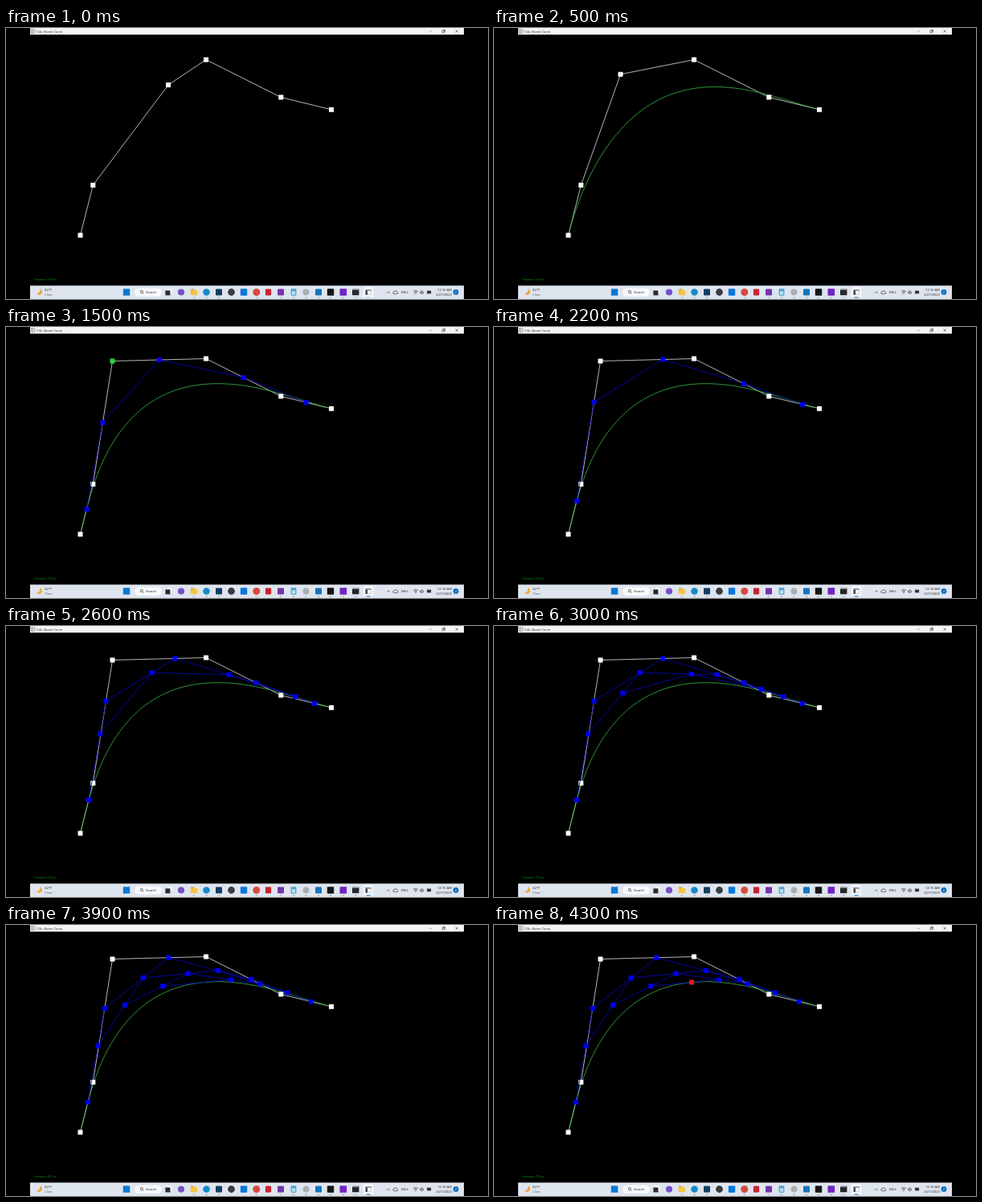
Recreate the animation shown at these times as an HTML page. Size 600 by 338 pixels, loop 4600 ms.

```html
<!DOCTYPE html>
<html lang="en">
<head>
<meta charset="utf-8">
<title>Bezier Curve</title>
<style>
html, body { margin: 0; width: 100%; height: 100%; overflow: hidden; background: #000; }
svg { display: block; width: 100%; height: 100%; font-family: "Open Sans", "Noto Sans", sans-serif; }
text { white-space: pre; }
</style>
</head>
<body>
<svg id="stage" viewBox="0 0 600 338">
  <rect width="600" height="338" fill="#000"/>

  <!-- title bar -->
  <rect x="30" width="540" height="8.3" fill="#f2f4f6"/>
  <rect x="31" y="1.7" width="5" height="4.8" fill="#fff" stroke="#777" stroke-width=".5"/>
  <path d="M32.6 1.7V6.5M34 3.2H35.4M34 4.8H35.4" stroke="#333" stroke-width=".6"/>
  <text id="title" x="38" y="5.5" font-size="3.9" fill="#222">CGL: Bezier Curve</text>
  <g fill="none" stroke="#333" stroke-width=".6">
    <path d="M526.7 4.2H530" stroke="#888"/>
    <path d="M543 3.2H545.6V5.8H543ZM544 3.2V2.3H546.5V4.8H545.6"/>
    <path d="M559.6 2.5L562.6 5.5M562.6 2.5L559.6 5.5"/>
  </g>

  <!-- drawing area -->
  <g fill="none" stroke-width=".8">
    <path id="hull" stroke="#e4e4e4"/>
    <path id="curve" stroke="#39bd45"/>
  </g>
  <g id="handles"></g>
  <path id="steps" fill="none" stroke="#0808c4" stroke-width=".8"/>
  <g id="dots"></g>
  <text id="fps" x="35" y="314.6" font-size="3.3" fill="#0a8a0a" font-family="Roboto, sans-serif"></text>

  <!-- taskbar -->
  <rect x="30" y="321.3" width="540" height="16.7" fill="#dfe5ee"/>
  <path d="M42.5 325.2A4 4 0 1 1 38 331.6A5.2 5.2 0 0 0 42.5 325.2Z" fill="#f0a52c"/>
  <g font-size="4.2" fill="#222">
    <text x="48" y="328.2">42°F</text>
    <text x="48" y="334" fill="#666">Clear</text>
    <rect x="160" y="324.4" width="34" height="10.4" rx="5.2" fill="#f7f9fc"/>
    <text x="174" y="331.2">Search</text>
    <text x="492" y="331.2">ENG</text>
    <text x="555" y="328.2" text-anchor="end">12:16 AM</text>
    <text x="555" y="334.2" text-anchor="end">2/27/2023</text>
  </g>
  <g fill="none" stroke="#333" stroke-width=".7">
    <circle cx="168.8" cy="329" r="1.6"/>
    <path d="M170 330.3L171.4 331.7"/>
    <path d="M474.2 330.6L476 328.8L477.8 330.6"/>
    <path d="M483.2 331.6A1.4 1.4 0 0 1 483.2 328.8A2 2 0 0 1 486.8 328.9A1.4 1.4 0 0 1 487 331.6Z"/>
    <path d="M507 328.6Q510 326 513 328.6M508.3 330Q510 328.6 511.7 330"/>
    <path d="M515.6 328.8H516.6L518 327.5V332L516.6 330.7H515.6ZM519.2 328.4Q520.4 329.7 519.2 331.1"/>
    <rect x="524.4" y="328" width="4.4" height="3" fill="#333"/>
  </g>
  <circle cx="510" cy="331.3" r=".7" fill="#333"/>
  <circle cx="560" cy="329.4" r="3.4" fill="#0a6fc0"/>
  <text x="560" y="330.8" font-size="3.6" fill="#fff" text-anchor="middle">2</text>
  <g id="icons"></g>
  <rect id="active" x="448.3" y="335.6" width="5.6" height="1" rx=".5"/>
</svg>

<script>
const LOOP = 4600, STEP = 100;
const $ = id => document.getElementById(id);
const NS = "http://www.w3.org/2000/svg";

function add(parent, tag, attrs) {
  const el = document.createElementNS(NS, tag);
  for (const k in attrs) el.setAttribute(k, attrs[k]);
  parent.appendChild(el);
  return el;
}

const box = (x, y, w, h, fill, rx = 0) =>
  add($("icons"), "rect", { x: x - w / 2, y: y - h / 2, width: w, height: h, rx, fill });
const disc = (x, y, r, fill) => add($("icons"), "circle", { cx: x, cy: y, r, fill });

function drawIcons() {
  const y = 329.5;
  box(150, y, 8.4, 8.4, "#0a78d4");
  box(203.4, 328.2, 5.6, 5.6, "#f7f8fa");
  box(201.4, 330.4, 6, 6, "#2b2b2b");
  disc(218, y, 4.1, "#7550c8");
  box(232, 326.6, 4, 2.4, "#d99a1c", .5);
  box(234, 330, 8.4, 6.4, "#f6c443", .6);
  disc(249.5, y, 4.3, "#168bc9");
  box(265, y, 8, 8, "#123f63", 1);
  disc(280.5, y, 4.4, "#3a3d40");
  box(296, y, 8.4, 8.4, "#0878dc", .8);
  disc(311.8, y, 4.5, "#d64a3c");
  box(326.5, y, 7.2, 8, "#c62332", 1);
  box(342, y, 8, 8, "#7434ac", 1);
  box(358, y, 6.8, 8.6, "#4aa6d4", .8);
  box(358, 330.5, 4.4, 4.4, "#b9e0ef");
  disc(373.5, y, 4, "#a9b0b3");
  box(389, y, 8, 8, "#1474bd", 1);
  box(404, y, 8.4, 8.4, "#151515", .6);
  box(419.8, y, 8.6, 8.6, "#7323c4", .6);
  box(435.2, y, 8.4, 7.6, "#242629", .6);
  box(435.2, 326.3, 8.4, 1.2, "#9a9da0");
  box(451, y, 12.5, 13, "#f3f6fa", 1.4);
  box(451, y, 7.6, 7, "#8c9096");
  box(452.4, 330.2, 4.2, 4.8, "#fff");
  box(448.8, 330.2, 1.8, 4.8, "#343a44");
  for (const x of [234, 249.5, 265, 311.8, 342, 358, 373.5, 389, 404, 419.8, 435.2])
    box(x, 336.1, 2.8, .9, "#858b94", .4);
}

// Eased value between [time, value] keys.
function track(keys, t) {
  if (t <= keys[0][0]) return keys[0][1];
  for (let i = 1; i < keys.length; i++) {
    const [t0, a] = keys[i - 1], [t1, b] = keys[i];
    if (t < t1) {
      const u = (t - t0) / (t1 - t0);
      return a + (b - a) * u * u * (3 - 2 * u);
    }
  }
  return keys[keys.length - 1][1];
}

const dragX = [[200, 202], [800, 113], [1000, 113], [1400, 132.5]];
const dragY = [[200, 71], [800, 44.5], [1000, 44.5], [1400, 42.5]];
const ratio = [[1600, .5], [1900, .88], [2200, .667], [3000, .667], [3500, .6]];
const rate = [[0, 307], [800, 377], [1500, 782], [2200, 688], [3000, 702], [3500, 802], [4300, 799]];
const levelStarts = [1400, 2400, 2900, 3400, 4100];

const mix = (a, b, u) => [a[0] + (b[0] - a[0]) * u, a[1] + (b[1] - a[1]) * u];
const reduce = (pts, u) => pts.slice(1).map((p, i) => mix(pts[i], p, u));
const line = pts => "M" + pts.map(p => p.map(v => v.toFixed(2)).join(" ")).join("L");

function pointAt(pts, u) {
  while (pts.length > 1) pts = reduce(pts, u);
  return pts[0];
}

const makeSquares = (parent, n) =>
  Array.from({ length: n }, () => add(parent, "rect", { width: 6, height: 6 }));

function place(square, p, fill) {
  square.setAttribute("x", p[0] - 3);
  square.setAttribute("y", p[1] - 3);
  square.setAttribute("fill", fill);
}

drawIcons();
const handles = makeSquares($("handles"), 6);
const dots = makeSquares($("dots"), 15);

function draw(t) {
  const pts = [[92.5, 258.5], [108.3, 196], [track(dragX, t), track(dragY, t)],
    [249, 39.5], [342.3, 86.4], [405, 101.8]];
  const held = t >= 1000 && t < 1800;
  $("hull").setAttribute("d", line(pts));
  handles.forEach((h, i) => place(h, pts[i], i === 2 && held ? "#2fd63a" : "#fff"));

  const samples = Array.from({ length: 101 }, (_, i) => pointAt(pts, i / 100));
  $("curve").setAttribute("d", t < 200 ? "" : line(samples));

  const u = track(ratio, t);
  let level = pts, path = "", used = 0;
  for (const start of levelStarts) {
    if (t < start) break;
    level = reduce(level, u);
    if (level.length > 1) path += line(level);
    for (const p of level) place(dots[used++], p, level.length > 1 ? "#0000f0" : "#f01414");
  }
  $("steps").setAttribute("d", path);
  dots.forEach((d, i) => d.setAttribute("display", i < used ? "inline" : "none"));

  $("fps").textContent = `Framerate: ${Math.round(track(rate, t))} fps`;
  $("active").setAttribute("fill", t < 100 ? "#b9c0ca" : "#1672c4");
}

const began = performance.now();
function tick() {
  const t = (performance.now() - began) % LOOP;
  draw(Math.floor(t / STEP) * STEP);
  requestAnimationFrame(tick);
}
tick();
</script>
</body>
</html>
```
